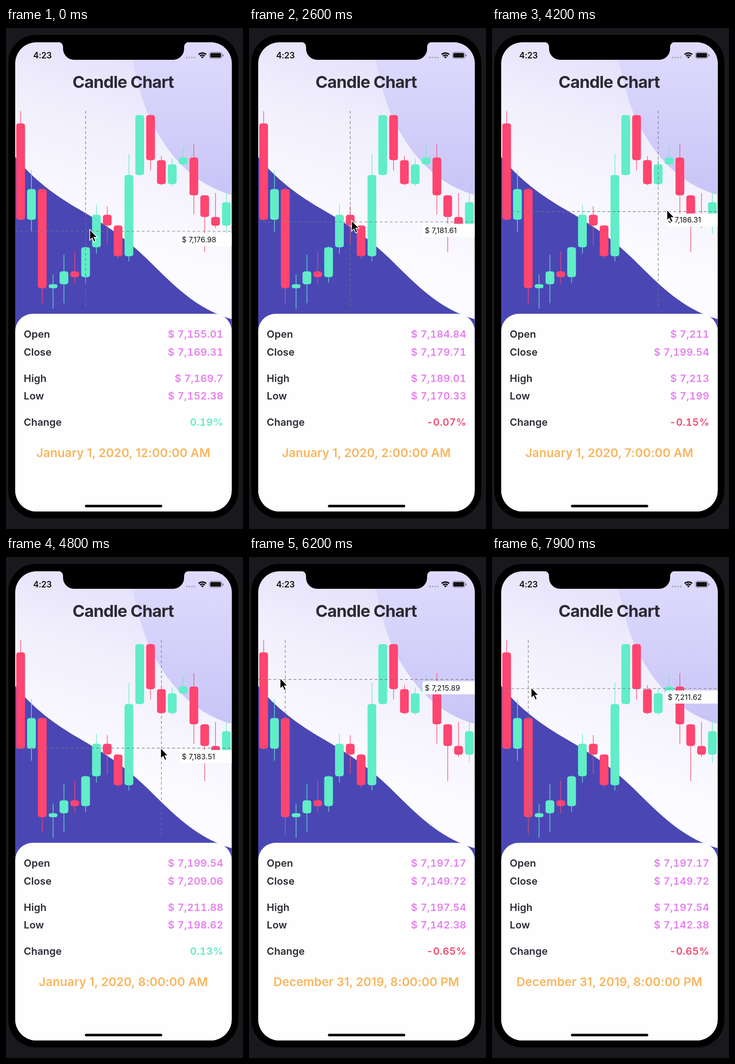
An HTML page for the animation above (8 s loop, 515x1087 px).

```html
<!DOCTYPE html>
<html lang="en">
<head>
<meta charset="utf-8">
<title>Candle Chart</title>
<style>
  html, body { margin: 0; width: 100%; height: 100%; overflow: hidden; background: #19181c; }
  svg { display: block; width: 515px; height: 1087px; }
  text { font-family: Inter, Roboto, sans-serif; font-weight: 600; fill: #2d2a35; }
  .title { font-size: 36px; font-weight: 700; letter-spacing: -.9px; text-anchor: middle; }
  .clock { font-size: 18.5px; letter-spacing: -.3px; fill: #111; }
  .row { font-size: 22px; }
  .value { font-size: 22px; letter-spacing: .3px; text-anchor: end; fill: #e57ff0; font-variant-numeric: tabular-nums; }
  .price { font-size: 16px; font-weight: 400; letter-spacing: .1px; fill: #111; }
  .date { font-size: 26px; letter-spacing: .05px; text-anchor: middle; fill: #f8b65f; }
  .cross { stroke: #74727c; stroke-width: 1.2; stroke-dasharray: 6 5; }
</style>
</head>
<body>
<svg viewBox="0 0 515 1087">
  <defs>
    <linearGradient id="sky" gradientUnits="userSpaceOnUse" x1="300" y1="20" x2="160" y2="450">
      <stop offset="0" stop-color="#e0ddfb"/><stop offset=".45" stop-color="#f1effc"/><stop offset="1" stop-color="#fcfbff"/>
    </linearGradient>
    <linearGradient id="blob" x1="0" y1="0" x2="0" y2="1">
      <stop offset="0" stop-color="#dfdbfd"/><stop offset="1" stop-color="#c8c5f7"/>
    </linearGradient>
    <clipPath id="screen"><rect x="20" y="31" width="470.5" height="1018" rx="46"/></clipPath>
  </defs>
  <rect x="5" y="15" width="500" height="1049" rx="60"/>
  <g clip-path="url(#screen)">
    <rect x="20" y="30" width="471" height="1020" fill="url(#sky)"/>
    <path d="M266 30C285 110 295 175 332 232C370 297 425 345 491 362V30z" fill="url(#blob)"/>
    <path d="M20 280C58 327 105 363 165 397C228 434 262 459 300 495C350 542 405 608 491 632V700H20z" fill="#4a47b5"/>
    <rect x="20" y="620" width="470.5" height="460" rx="38" fill="#fefefe"/>
    <path d="M112 30Q124 31 124 42V45a24 24 0 0 0 24 24H363a24 24 0 0 0 24-24V42Q387 31 399 30z"/>
    <text class="clock" x="59" y="66">4:23</text>
    <path d="M393 64H411" stroke="#b1aec6" stroke-width="4" stroke-linecap="round" stroke-dasharray="0 5.6"/>
    <path d="M418.500 57.500a12 12 0 0 1 16.500 0M421.500 61a7.500 7.500 0 0 1 10.500 0" fill="none" stroke="#111" stroke-width="3"/>
    <path d="M426.800 66l-3-3a4.200 4.200 0 0 1 6 0z" fill="#111"/>
    <rect x="442" y="52.500" width="27" height="13.500" rx="4" fill="none" stroke="#77758a"/>
    <rect x="443.800" y="54.300" width="23.400" height="9.900" rx="2.500" fill="#111"/>
    <path d="M470.300 57a2.500 2.500 0 0 1 0 5z" fill="#77758a"/>
    <text class="title" x="254.500" y="130">Candle Chart</text>
    <g id="candles"></g>
    <path id="vline" class="cross" d="M0 180V609"/>
    <path id="hline" class="cross" d="M20 0H490.500"/>
    <g id="tip">
      <rect x="377" y="4" width="118" height="28.500" rx="4" fill="#fefefe"/>
      <text id="price" class="price" x="382" y="24"></text>
    </g>
    <g id="rows"></g>
    <text id="date" class="date" x="255" y="930.500"></text>
    <rect x="171.500" y="1034.500" width="168" height="5.500" rx="2.700"/>
  </g>
  <path id="cursor" d="M0 0V23.500L5.300 18.500L9.200 27L13 25.300L9.200 17H16.300z" stroke="#fff" stroke-width="1.500"/>
</svg>
<script>
const $ = id => document.getElementById(id);
const LEFT = 20, STEP = 23.53, GREEN = '#60edc8', RED = '#ff4570';
const FIRST_OPEN = 7228.62, MIDNIGHT = 6;

// close, high, low per hour; each hour opens at the previous close
const hours = [
  [7182.49, 7234.47, 7182.3], [7197.17, 7206.33, 7176.75], [7149.72, 7197.54, 7142.38],
  [7151.6, 7156.2, 7139.9], [7157.78, 7165.7, 7142.5], [7155.01, 7167.3, 7151.6],
  [7169.31, 7169.7, 7152.38], [7184.84, 7189.68, 7166.26], [7179.71, 7189.01, 7170.33],
  [7165.01, 7179.91, 7163.85], [7203.9, 7214, 7162.6], [7232.59, 7232.6, 7203.7],
  [7211, 7232.8, 7206.1], [7199.54, 7213, 7199], [7209.06, 7211.88, 7198.62],
  [7212.29, 7217.8, 7208.8], [7194.19, 7218.7, 7184.9], [7183.82, 7194.3, 7167],
  [7179.62, 7195.3, 7178.5], [7190.88, 7195.3, 7175.9]
];
const candles = hours.map(([close, high, low], i) => [i ? hours[i - 1][0] : FIRST_OPEN, close, high, low]);

// pointer stops: time, x, y
const stops = [
  [0, 182, 437], [500, 195, 437], [1000, 195, 437], [2400, 219, 416], [3400, 238, 423.3], [3500, 250, 396],
  [4200, 380, 394.2], [4800, 336, 414], [6000, 72, 260.7], [7000, 50, 269.6], [7900, 85, 283]
];

const yOf = p => 349.5 - (p - 7197.17) / .2207;
const priceAt = y => 7197.17 - (y - 349.5) * .2207;
const centre = i => LEFT + STEP * (i + .5);
const money = (p, min = 0) => '$ ' + p.toLocaleString('en-US', { minimumFractionDigits: min, maximumFractionDigits: 2 });

$('candles').innerHTML = candles.map(([open, close, high, low], i) => {
  const x = centre(i), top = yOf(Math.max(open, close)), h = yOf(Math.min(open, close)) - top;
  const color = close > open ? GREEN : RED;
  return `<path d="M${x} ${yOf(high)}V${yOf(low)}" stroke="${color}" stroke-width="1.3"/>` +
    `<rect x="${x - 9.5}" y="${top}" width="19" height="${h}" rx="${Math.min(5, h / 2)}" fill="${color}"/>`;
}).join('');

// rows sit in pairs, with a wider gap after each pair
$('rows').innerHTML = ['Open', 'Close', 'High', 'Low', 'Change'].map((name, i) => {
  const y = 672 + 38.5 * i + 18.5 * Math.floor(i / 2);
  return `<text class="row" x="38.5" y="${y}">${name}</text><text class="value" x="472.3" y="${y}"></text>`;
}).join('');
const values = [...document.querySelectorAll('.value')];

function pointer(t) {
  t = Math.max(0, t);
  const i = Math.max(1, stops.findIndex(s => s[0] >= t));
  const [t0, x0, y0] = stops[i - 1], [t1, x1, y1] = stops[i];
  const k = (t - t0) / (t1 - t0);
  const x = x0 + (x1 - x0) * k, y = y0 + (y1 - y0) * k;
  return { x, y, lineY: y + 4, index: Math.floor((x - LEFT) / STEP) };
}

function showCandle(i) {
  const c = candles[i], change = Math.trunc((c[1] - c[0]) / c[0] * 1e4) / 100;
  c.forEach((p, n) => values[n].textContent = money(p));
  values[4].textContent = change.toFixed(2) + '%';
  values[4].style.fill = change < 0 ? '#f04b73' : GREEN;
  const hour = (i - MIDNIGHT + 24) % 24;
  $('date').textContent = (i < MIDNIGHT ? 'December 31, 2019, ' : 'January 1, 2020, ') +
    (hour % 12 || 12) + ':00:00 ' + (hour < 12 ? 'AM' : 'PM');
}

const move = (id, x, y) => $(id).setAttribute('transform', `translate(${x} ${y})`);

// The crosshair trails the pointer by one step, the numbers by two.
function draw(now) {
  const t = Math.floor(now % 8000 / 100) * 100;
  const hand = pointer(t), line = pointer(t - 100), text = pointer(t - 200);
  move('cursor', hand.x, hand.y);
  move('vline', centre(line.index), 0);
  move('hline', 0, line.lineY);
  move('tip', 0, line.lineY);
  $('price').textContent = money(priceAt(text.lineY), 2);
  showCandle(text.index);
  requestAnimationFrame(draw);
}
draw(0);
</script>
</body>
</html>
```
